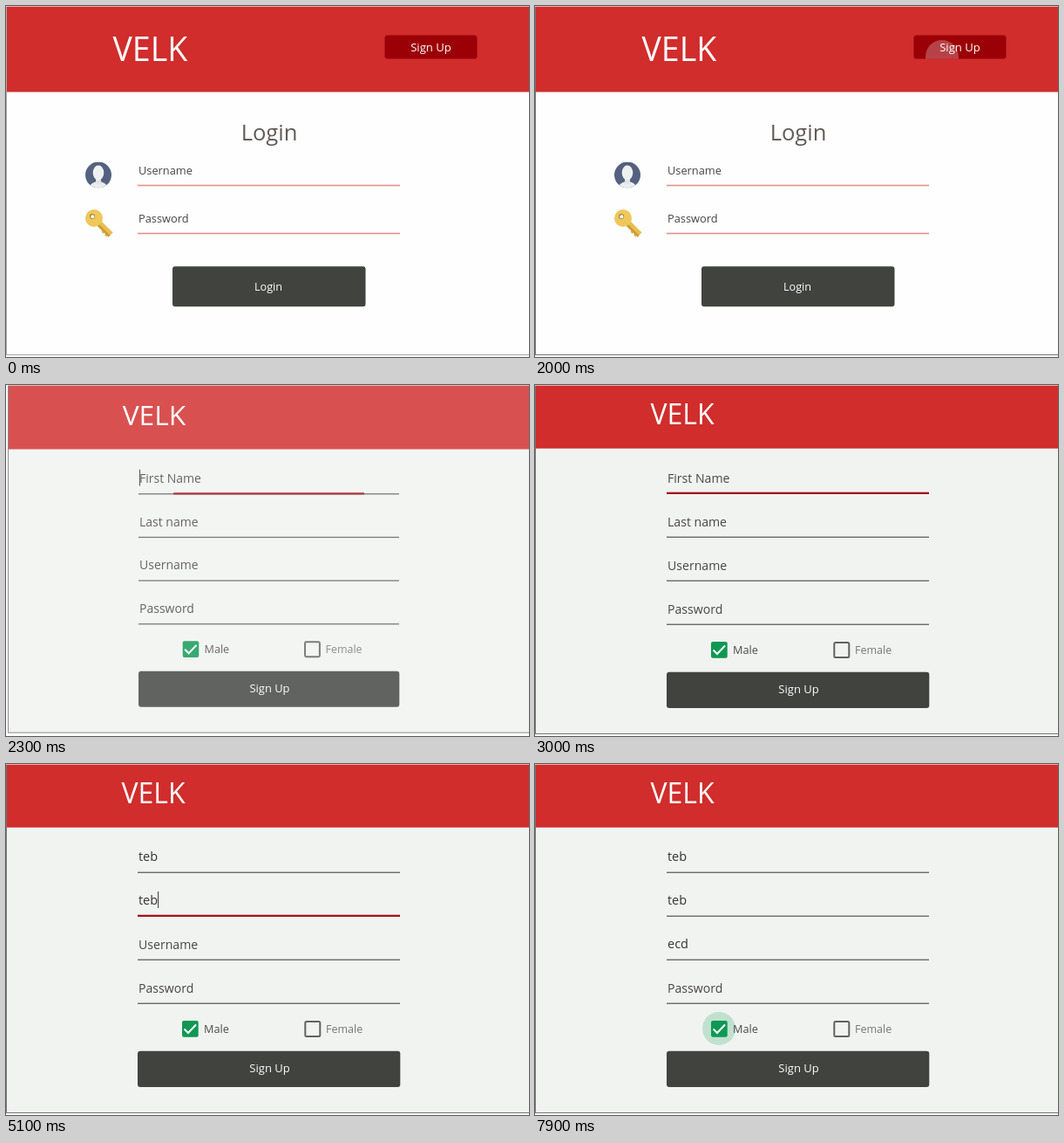
Animation of 600 by 402 pixels, one loop 8000 ms. Source, as an HTML page with a canvas:

```html
<!DOCTYPE html>
<html lang="en">
<head>
<meta charset="utf-8">
<title>Login and sign up</title>
<style>
  html, body { margin: 0; width: 100%; height: 100%; overflow: hidden; background: #fff; }
  canvas { display: block; width: 600px; height: 402px; }
</style>
</head>
<body>
<canvas id="stage"></canvas>
<script>
const W = 600, H = 402, LOOP = 8000, STEP = 100;
const RED = '#d02d2c', DARK = '#41433f', FOCUS = '#a0141a', LEFT = 151, RIGHT = 452;
const APP = 'VELK', NAME = 'teb', USER = 'ecd';
const TYPED_SIZE = 14.5;

// Focus and key times of the sign-up fields
const FIELDS = [
  { label: 'First Name', value: NAME, focus: 2135, keys: [3400, 3500, 3700], blur: 3900 },
  { label: 'Last name', value: NAME, focus: 3850, keys: [4700, 4800, 5000], blur: 5520 },
  { label: 'Username', value: USER, focus: 5520, keys: [6600, 6700, 7000], blur: 7600 },
  { label: 'Password', value: '', focus: Infinity, keys: [], blur: Infinity }
];

const canvas = document.getElementById('stage');
const dpr = window.devicePixelRatio || 1;
canvas.width = W * dpr;
canvas.height = H * dpr;
const ctx = canvas.getContext('2d');

const layer = document.createElement('canvas');
layer.width = canvas.width;
layer.height = canvas.height;
const under = layer.getContext('2d');

const clamp = x => Math.max(0, Math.min(1, x));
const smooth = x => { x = clamp(x); return x * x * (3 - 2 * x); };
const easeOut = x => 1 - (1 - clamp(x)) ** 2;
const blinkOn = (t, since) => t >= since && Math.floor((t - since) / 500) % 2 === 0;

function rect(x, y, w, h, color) {
  ctx.fillStyle = color;
  ctx.fillRect(x, y, w, h);
}

function roundRect(x, y, w, h, r, color) {
  ctx.beginPath();
  ctx.roundRect(x, y, w, h, r);
  ctx.fillStyle = color;
  ctx.fill();
}

function ellipse(x, y, rx, ry, color) {
  ctx.beginPath();
  ctx.ellipse(x, y, rx, ry, 0, 0, Math.PI * 2);
  ctx.fillStyle = color;
  ctx.fill();
}

const circle = (x, y, r, color) => ellipse(x, y, r, r, color);

function setFont(size) {
  ctx.font = `${size}px "Open Sans", "Noto Sans", sans-serif`;
}

function text(str, x, y, size, color, align = 'left') {
  setFont(size);
  ctx.textAlign = align;
  ctx.fillStyle = color;
  ctx.fillText(str, x, y);
}

function textWidth(str, size) {
  setFont(size);
  return ctx.measureText(str).width;
}

function focusLine(y, amount) {
  const w = (RIGHT - LEFT) * amount;
  rect((LEFT + RIGHT - w) / 2, y, w, 2.3, FOCUS);
}

function page(background, headerHeight, border) {
  rect(0, -4, 603, 404, background);
  rect(0, -4, 603, headerHeight + 4, RED);
  ctx.strokeStyle = border;
  ctx.lineWidth = 1;
  ctx.strokeRect(0.5, -4.5, 602, 404);
}

function userIcon(x, y) {
  ctx.save();
  ctx.beginPath();
  ctx.arc(x, y, 15, 0, Math.PI * 2);
  ctx.clip();
  rect(x - 15, y - 15, 30, 30, '#55617f');
  ellipse(x, y + 14, 10, 6.5, '#e9eded');
  rect(x - 3, y + 3, 6, 7, '#dfe4e4');
  ellipse(x, y - 2.5, 6.3, 8.5, '#eef1f1');
  ctx.restore();
}

function keyIcon(x, y) {
  ctx.save();
  ctx.translate(x, y);
  ctx.rotate(Math.PI / 4);
  rect(6, -3.5, 21, 7, '#e9bd4e');
  rect(8, 1, 19, 2.5, '#c99a35');
  rect(17, 3, 3, 2, '#d9a93f');
  rect(22, 3, 3, 2, '#d9a93f');
  ctx.restore();
  circle(x, y, 10, '#efc75a');
  circle(x - 2, y - 2, 3, '#9d8440');
  circle(x - 1.7, y - 1.7, 2, '#fdfefd');
}

function loginPage(t) {
  const active = t >= 800;
  page('#fdfefd', 98.5, active ? '#747474' : '#a6a6a6');
  text(APP, 122.5, 63, 37.5, '#fff');

  roundRect(434.5, 33.5, 106, 27, 3, '#9c0007');
  if (t >= 2000) {
    ctx.save();
    ctx.beginPath();
    ctx.roundRect(434.5, 33.5, 106, 27, 3);
    ctx.clip();
    circle(467, 58, 19 + 18 * (t - 2000) / 100, 'rgba(255,255,255,0.26)');
    ctx.restore();
  }
  text('Sign Up', 487.5, 52, 13.1, '#fff', 'center');

  text('Login', 302, 154, 25.5, '#625a58', 'center');
  userIcon(106, 193.5);
  keyIcon(101, 243);
  text('Username', 152, 193, 12.8, '#454545');
  text('Password', 152, 248, 12.8, '#454545');
  for (const y of [204.7, 259.7]) rect(LEFT, y, RIGHT - LEFT, 1.6, '#e58f8b');

  if (active && t < 2000) {
    focusLine(204.2, smooth((t - 780) / 250));
    if (blinkOn(t, 780)) rect(152, 179, 1, 18, '#333');
  }

  roundRect(191, 298.2, 221.5, 46, 3, DARK);
  text('Login', 301, 326, 12.7, '#fff', 'center');
}

function drawField(field, i, t) {
  const base = 111.5 + 50 * i, lineY = 123.6 + 50 * i;
  const pressed = field.keys.filter(k => k <= t);
  const typed = field.value.slice(0, pressed.length);
  rect(LEFT, lineY, RIGHT - LEFT, 1.3, '#5e605d');
  if (typed) text(typed, 152, base - 0.5, TYPED_SIZE, '#333');
  else text(field.label, 152, base, 14.1, '#464646');

  if (t < field.focus || t >= field.blur) return;
  focusLine(lineY - 0.9, smooth((t - field.focus) / 250));
  // The caret restarts its blink on each key
  const since = pressed.at(-1) ?? Math.ceil(field.focus / STEP) * STEP;
  if (blinkOn(t, since)) rect(152 + textWidth(typed, TYPED_SIZE), lineY - 27.6, 1, 19, '#333');
}

function signUpPage(t) {
  page('#f1f3f0', 72.7, '#747474');
  text(APP, 132.5, 45, 32, '#fff');
  FIELDS.forEach((field, i) => drawField(field, i, t));

  if (t >= 7600) circle(211, 303, 19 * easeOut((t - 7540) / 360), 'rgba(15,157,88,0.21)');
  roundRect(202, 294, 18.7, 18.7, 2, '#0f9854');
  ctx.beginPath();
  ctx.moveTo(204.5, 303.5);
  ctx.lineTo(209, 308);
  ctx.lineTo(218, 298.5);
  ctx.strokeStyle = '#fff';
  ctx.lineWidth = 2;
  ctx.stroke();
  text('Male', 227, 308, 12.7, '#4c4c4c');

  ctx.beginPath();
  ctx.roundRect(343.3, 295, 17, 17, 1.5);
  ctx.strokeStyle = '#626262';
  ctx.stroke();
  text('Female', 367, 308, 12.5, '#777');

  roundRect(LEFT, 328.7, 301.3, 41.3, 3, DARK);
  text('Sign Up', 302.5, 353, 13, '#fff', 'center');
}

// Draws a whole window scaled about its centre, then blends it in
function fadeWindow(paint, t, alpha, shrink) {
  if (alpha <= 0) return;
  const scale = 1 - shrink * (1 - alpha);
  under.clearRect(0, 0, layer.width, layer.height);
  under.drawImage(canvas, 0, 0);
  ctx.save();
  ctx.translate(302, 200);
  ctx.scale(scale, scale);
  ctx.translate(-302, -200);
  paint(t);
  ctx.restore();
  if (alpha < 1) {
    ctx.save();
    ctx.setTransform(1, 0, 0, 1, 0, 0);
    ctx.globalAlpha = 1 - alpha;
    ctx.drawImage(layer, 0, 0);
    ctx.restore();
  }
}

function draw(t) {
  ctx.setTransform(dpr, 0, 0, dpr, 0, 0);
  rect(0, 0, W, H, '#fff');
  if (t < 2300) {
    const gone = Math.max(0, t - 2000) / 265;
    fadeWindow(loginPage, t, 1 - gone ** 1.27, 0.048);
  }
  if (t > 2100) fadeWindow(signUpPage, t, easeOut((t - 2100) / 340), 0.04);
  // Pale edge along the top of the stage
  rect(0, 0, W, 1, 'rgba(255,255,255,0.6)');
}

const begin = performance.now();
function tick() {
  const time = (performance.now() - begin) % LOOP;
  draw(Math.floor(time / STEP) * STEP);
  requestAnimationFrame(tick);
}
tick();
</script>
</body>
</html>
```
